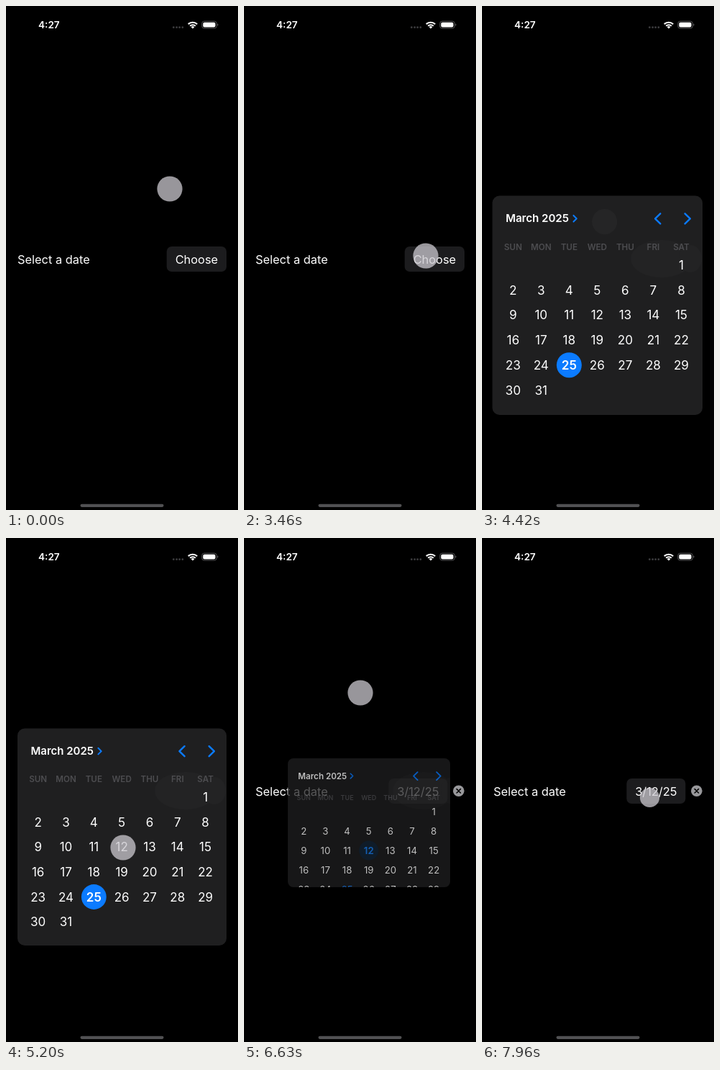
An HTML page for the animation above (8 s loop, 323x700 px).

```html
<!DOCTYPE html>
<html lang="en">
<head>
<meta charset="utf-8">
<title>Date picker</title>
<style>
  html, body { margin: 0; width: 100%; height: 100%; overflow: hidden; background: #000; }
  svg { display: block; width: 100vw; height: 100vh; font-family: Inter, Roboto, sans-serif; }
  text { fill: #fff; }
  .body { font-size: 16.4px; }
  .middle { text-anchor: middle; }
  .semi { font-weight: 600; }
  .day { font-size: 17px; text-anchor: middle; }
  .weekday { font-size: 11.6px; font-weight: 600; text-anchor: middle; fill: #4d4d50; }
  .chevron { fill: none; stroke: #0b7bff; stroke-linecap: round; stroke-linejoin: round; }
</style>
</head>
<body>
<svg viewBox="0 0 323 700">
  <defs>
    <clipPath id="clip"><rect id="clipRect"/></clipPath>
  </defs>
  <rect width="323" height="700"/>

  <text class="semi" x="45" y="31" font-size="13.6">4:27</text>
  <g fill="#3d3d3f">
    <circle cx="233.3" cy="29.7" r="1.4"/><circle cx="237.6" cy="29.7" r="1.4"/>
    <circle cx="241.6" cy="29.7" r="1.4"/><circle cx="245.8" cy="29.7" r="1.4"/>
  </g>
  <g fill="none" stroke="#fff" stroke-width="2">
    <path d="M253.8 25.2A8.8 8.8 0 0 1 266.2 25.2"/>
    <path d="M256.2 27.7A5.4 5.4 0 0 1 263.8 27.7"/>
  </g>
  <path d="M260 31.6L257.7 29.2A3.2 3.2 0 0 1 262.3 29.2Z" fill="#fff"/>
  <rect x="272.7" y="21.2" width="20.6" height="9.8" rx="3.2" fill="none" stroke="#5e5e60" stroke-width=".9"/>
  <rect x="274.3" y="22.7" width="17.2" height="6.8" rx="2" fill="#fff"/>
  <path d="M294.4 24.5a1.7 1.7 0 0 1 0 3.2z" fill="#5e5e60"/>

  <text class="body" x="16" y="357.6">Select a date</text>
  <g id="emptyField">
    <rect x="223.7" y="334" width="83.3" height="35" rx="7" fill="#1c1c1e"/>
    <text class="body middle" x="265.4" y="357.6">Choose</text>
  </g>
  <g id="filledField">
    <rect x="201.3" y="334" width="82" height="35" rx="7" fill="#1c1c1e"/>
    <text class="body middle" x="242.3" y="357.6">3/12/25</text>
    <circle cx="298.8" cy="351.3" r="7.8" fill="#98989b"/>
    <path d="M296.1 348.6l5.4 5.4m0-5.4l-5.4 5.4" stroke="#000" stroke-width="1.5" stroke-linecap="round"/>
  </g>

  <g id="popover" clip-path="url(#clip)">
    <rect width="323" height="700" fill="#1f1f20"/>
    <g fill="#232324">
      <ellipse cx="250" cy="351" rx="43" ry="26"/>
      <ellipse cx="290" cy="351" rx="16" ry="19"/>
    </g>
    <g id="calendar">
      <text class="semi" x="34.5" y="301.3" font-size="15">March 2025</text>
      <path class="chevron" d="M128.4 291.8l4.3 4.3-4.3 4.3" stroke-width="2"/>
      <path class="chevron" d="M248.6 289.2l-7.2 7 7.2 7" stroke-width="2.4"/>
      <path class="chevron" d="M282.7 289.2l7.2 7-7.2 7" stroke-width="2.4"/>
    </g>
  </g>

  <circle id="pointer" fill="#cbc8cf"/>
  <rect x="103.5" y="691.7" width="116" height="4.2" rx="2.1" fill="#515153"/>
</svg>
<script>
const LOOP = 8000;
const STEP = 70;
const SELECT_AT = 5290;
const OPEN = { x: 16, y: 264.5, w: 291, h: 301.5 };
const byId = id => document.getElementById(id);
const lerp = (a, b, k) => a + (b - a) * k;
const clamp = v => Math.min(1, Math.max(0, v));

function set(node, attrs) {
  for (const key in attrs) node.setAttribute(key, attrs[key]);
}
function add(parent, tag, attrs, content = '') {
  const node = document.createElementNS('http://www.w3.org/2000/svg', tag);
  set(node, attrs);
  node.textContent = content;
  return parent.appendChild(node);
}

const calendar = byId('calendar');
const columnX = c => 44.7 + c * 38.82;
const rowY = r => 360 + r * 34.62;
const spot = day => ({ x: columnX((day + 5) % 7), y: rowY(Math.floor((day + 5) / 7)) });

function addDisc(day, fill) {
  const { x, y } = spot(day);
  return add(calendar, 'circle', { cx: x, cy: y, r: 17.4, fill });
}
const todayDisc = addDisc(25, '#0b7bff');
const pickedDisc = addDisc(12, '#152637');

'SUN MON TUE WED THU FRI SAT'.split(' ').forEach((name, c) =>
  add(calendar, 'text', { class: 'weekday', x: columnX(c), y: 339.2 }, name));
const days = [];
for (let day = 1; day <= 31; day++) {
  const { x, y } = spot(day);
  days[day] = add(calendar, 'text', { class: 'day', x, y: y + 6.2 }, day);
}

// The picture refreshes in bursts of equal steps and rests in between.
const bursts = [
  [0, 5], [420, 1], [690, 2], [3460, 1], [3690, 1], [3790, 12], [4790, 5],
  [5290, 7], [5980, 2], [6210, 9], [6900, 2], [7270, 8], [7960, 1]
];
function refreshTime(t) {
  const [first, count] = bursts.filter(b => b[0] <= t).pop();
  return first + STEP * Math.min(count - 1, Math.floor((t - first) / STEP));
}

const path = [
  [0, 228, 254], [280, 186, 244], [620, 186, 244], [690, 238, 310], [760, 238, 310],
  [3460, 253, 347], [3860, 250, 346], [4210, 171, 296], [4790, 170, 306],
  [5070, 163, 430], [5360, 163, 430], [5640, 164, 208], [5710, 160, 239],
  [6050, 160, 239], [6350, 162, 215], [6700, 162, 215], [6970, 160, 256],
  [7270, 164, 262], [7690, 233.5, 360.5]
];
const visibility = [
  [0, 1], [280, 1], [420, .3], [690, 1], [760, .29], [3460, 1], [4210, 1],
  [4420, .04], [4490, 0], [4790, .6], [5070, 1], [5710, 1], [5980, .39],
  [6050, .1], [6210, .7], [6350, 1], [6770, 1], [6970, 0], [7270, .7], [7690, 1]
];
const presses = [[3690, 3790], [SELECT_AT, 5360], [6420, 6490], [7760, LOOP]];

function sample(keys, t) {
  const next = keys.findIndex(k => k[0] > t);
  if (next < 0) return keys[keys.length - 1].slice(1);
  const a = keys[next - 1], b = keys[next];
  const k = (t - a[0]) / (b[0] - a[0]);
  return a.map((v, i) => lerp(v, b[i], k)).slice(1);
}

function openness(t) {
  if (t < 3740 || t >= 6840) return 0;
  if (t < 4560) {
    const u = (t - 3740) / 1000, decay = 7, rate = 5.2;
    return 1 - Math.exp(-decay * u) * (Math.cos(rate * u) + decay / rate * Math.sin(rate * u));
  }
  const k = clamp((t - 6420) / 420);
  return 1 - k * k * (3 - 2 * k);
}

function drawPopover(t) {
  const open = openness(t);
  const x = lerp(t < SELECT_AT ? 146 : 106, OPEN.x, open);
  const y = lerp(347.5, OPEN.y, open);
  const width = lerp(161, OPEN.w, open);
  const height = lerp(56.5, OPEN.h, open);
  const scale = width / OPEN.w;
  set(byId('clipRect'), { x, y, width, height, rx: 10 * scale });
  set(calendar, { transform: `translate(${x} ${y}) scale(${scale}) translate(${-OPEN.x} ${-OPEN.y})` });
  set(byId('popover'), { opacity: clamp(1 - (1 - open) ** 2), display: open > 0 ? 'inline' : 'none' });
}

function drawSelection(picked) {
  const show = (node, on) => set(node, { display: on ? 'inline' : 'none' });
  const styleDay = (day, tinted, bold) => Object.assign(days[day].style,
    { fill: tinted ? '#1b7ff0' : '#fff', fontWeight: bold ? 600 : 400 });
  show(byId('emptyField'), !picked);
  show(byId('filledField'), picked);
  show(todayDisc, !picked);
  show(pickedDisc, picked);
  styleDay(25, picked, !picked);
  styleDay(12, picked, picked);
}

function drawPointer(t) {
  const [cx, cy] = sample(path, t);
  const [alpha] = sample(visibility, t);
  const pressed = presses.some(([from, to]) => t >= from && t < to);
  set(byId('pointer'), { cx, cy, r: pressed ? 13.6 : 17.6, opacity: alpha * .75 });
}

function draw(now) {
  const t = refreshTime(now % LOOP);
  drawPopover(t);
  drawSelection(t >= SELECT_AT);
  drawPointer(t);
}

const start = performance.now();
function tick() {
  draw(performance.now() - start);
  requestAnimationFrame(tick);
}
tick();
</script>
</body>
</html>
```
